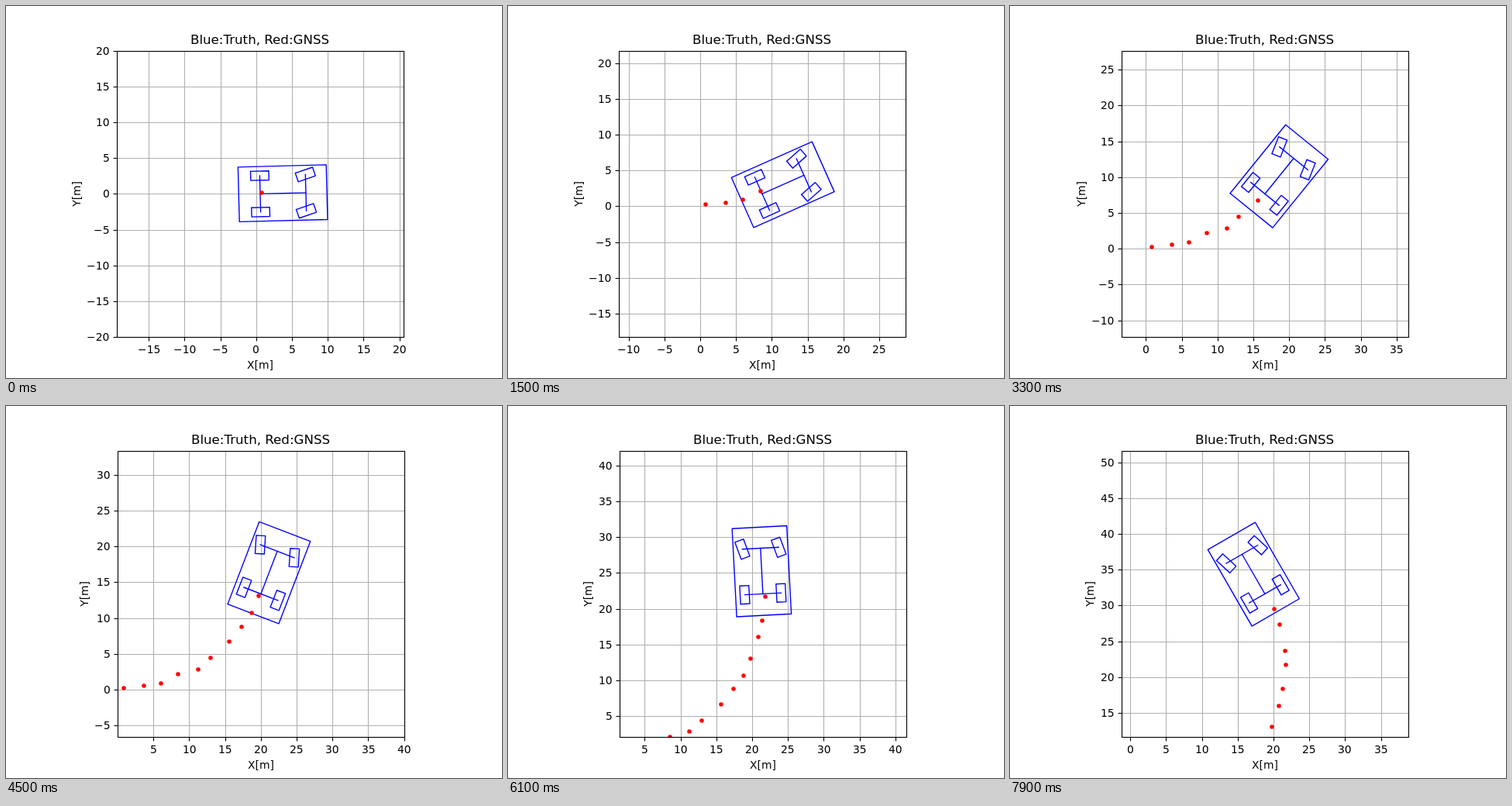
These frames come from a looping animation (640 by 480 pixels, 8000 ms). An HTML page with a canvas:

```html
<!DOCTYPE html>
<html lang="en">
<head>
<meta charset="utf-8">
<title>Vehicle and position fixes</title>
<style>
html, body { margin: 0; width: 100%; height: 100%; overflow: hidden; background: #fff; }
canvas { display: block; }
</style>
</head>
<body>
<canvas id="stage" width="640" height="480"></canvas>
<script>
const ctx = document.getElementById('stage').getContext('2d');
const FONT = '"DejaVu Sans", Verdana, sans-serif';
const RAD = Math.PI / 180;
const LOOP = 8000, TICK = 100;
const SCALE = 9.24, HALF = 20, MID_Y = 242.4, TOP = 57.6, BOTTOM = 427.2;
const STEP = 0.556, TURN = 1.5 * RAD, STEER = 17.5 * RAD;
const BASE = 6.38, TRACK = 2.54;

// position fixes in metres, one every five steps
const fixes = [
  [0.81, 0.2], [3.62, 0.52], [6, 0.88], [8.48, 2.14],
  [11.28, 2.82], [12.93, 4.4], [15.62, 6.68], [17.36, 8.78],
  [18.77, 10.65], [19.74, 13.04], [20.82, 16], [21.36, 18.35],
  [21.79, 21.65], [21.58, 23.7], [20.91, 27.36], [20.15, 29.52]
];

const snap = v => Math.round(v) + 0.5;

// rear axle after n straight steps, turning after each one
function pose(n) {
  const chord = STEP * Math.sin(n * TURN / 2) / Math.sin(TURN / 2);
  const dir = (n - 1) * TURN / 2;
  return { x: chord * Math.cos(dir), y: chord * Math.sin(dir), yaw: n * TURN };
}

function ticks(mid) {
  const list = [];
  const last = mid + HALF + 1e-9;
  for (let v = Math.ceil((mid - HALF - 1e-9) / 5) * 5; v <= last; v += 5) list.push(v);
  return list;
}

const label = v => (v < 0 ? '\u2212' : '') + Math.abs(v);

function line(points) {
  ctx.beginPath();
  points.forEach(([x, y]) => ctx.lineTo(x, y));
  ctx.stroke();
}

function centred(text, x, y) {
  ctx.fillText(text, Math.round(x - ctx.measureText(text).width / 2), y);
}

function box(x0, x1, h, put) {
  const c = [[x0, h], [x1, h], [x1, -h], [x0, -h], [x0, h]];
  line(c.map(put));
}

function drawCar(car, midX) {
  const cos = Math.cos(car.yaw), sin = Math.sin(car.yaw);
  const put = ([f, l]) => [
    midX + (f * cos - l * sin) * SCALE,
    MID_Y - (f * sin + l * cos) * SCALE
  ];
  const wheel = (f, l, angle) => {
    const c = Math.cos(angle), s = Math.sin(angle);
    box(-1.27, 1.27, 0.64, ([a, b]) => put([f + a * c - b * s, l + a * s + b * c]));
  };
  ctx.strokeStyle = '#00f';
  ctx.lineWidth = 1.39;
  ctx.lineCap = 'square';
  ctx.lineJoin = 'round';
  box(-3, 9.32, 3.82, put);
  for (const side of [TRACK, -TRACK]) {
    wheel(0, side, 0);
    wheel(BASE, side, STEER);
  }
  for (const f of [0, BASE]) line([[f, TRACK], [f, -TRACK]].map(put));
  line([[0, 0], [BASE, 0]].map(put));
}

function draw(time) {
  const n = Math.floor(time / TICK) + 1;
  const car = pose(n);
  const midX = n < 24 ? 328 : 328.9;
  const left = midX - HALF * SCALE, right = midX + HALF * SCALE;
  const l = snap(left), r = snap(right), t = snap(TOP), b = snap(BOTTOM);
  const px = x => midX + (x - car.x) * SCALE;
  const py = y => MID_Y - (y - car.y) * SCALE;
  const xs = ticks(car.x), ys = ticks(car.y);

  ctx.fillStyle = '#fff';
  ctx.fillRect(0, 0, 640, 480);

  ctx.lineCap = 'butt';
  ctx.lineWidth = 1.11;
  ctx.strokeStyle = '#b0b0b0';
  for (const v of xs) line([[snap(px(v)), t], [snap(px(v)), b]]);
  for (const v of ys) line([[l, snap(py(v))], [r, snap(py(v))]]);

  ctx.save();
  ctx.beginPath();
  ctx.rect(left, TOP, right - left, BOTTOM - TOP);
  ctx.clip();
  drawCar(car, midX);
  ctx.fillStyle = '#f00';
  fixes.slice(0, Math.floor((n - 1) / 5) + 1).forEach(([x, y]) => {
    ctx.beginPath();
    ctx.arc(Math.round(px(x)), Math.round(py(y)), 2.78, 0, 7);
    ctx.fill();
  });
  ctx.restore();

  ctx.strokeStyle = ctx.fillStyle = '#000';
  ctx.lineWidth = 1.11;
  ctx.lineCap = 'butt';
  ctx.lineJoin = 'miter';
  ctx.strokeRect(l, t, r - l, b - t);

  ctx.font = '13.89px ' + FONT;
  for (const v of xs) {
    const x = snap(px(v));
    line([[x, b], [x, b + 5]]);
    centred(label(v), px(v), 448);
  }
  let widest = 0;
  for (const v of ys) {
    const y = snap(py(v)), w = ctx.measureText(label(v)).width;
    widest = Math.max(widest, w);
    line([[l, y], [l - 5, y]]);
    ctx.fillText(label(v), Math.round(left - 9.72 - w), Math.round(py(v)) + 5);
  }
  centred('X[m]', midX, 468);
  ctx.save();
  ctx.translate(Math.round(left - 18.1 - widest), MID_Y);
  ctx.rotate(-Math.PI / 2);
  ctx.fillText('Y[m]', -ctx.measureText('Y[m]').width / 2, 0);
  ctx.restore();

  ctx.font = '16.67px ' + FONT;
  centred('Blue:Truth, Red:GNSS', midX, 49);
}

const start = performance.now();
function frame() {
  draw((performance.now() - start) % LOOP);
  requestAnimationFrame(frame);
}
frame();
</script>
</body>
</html>
```
